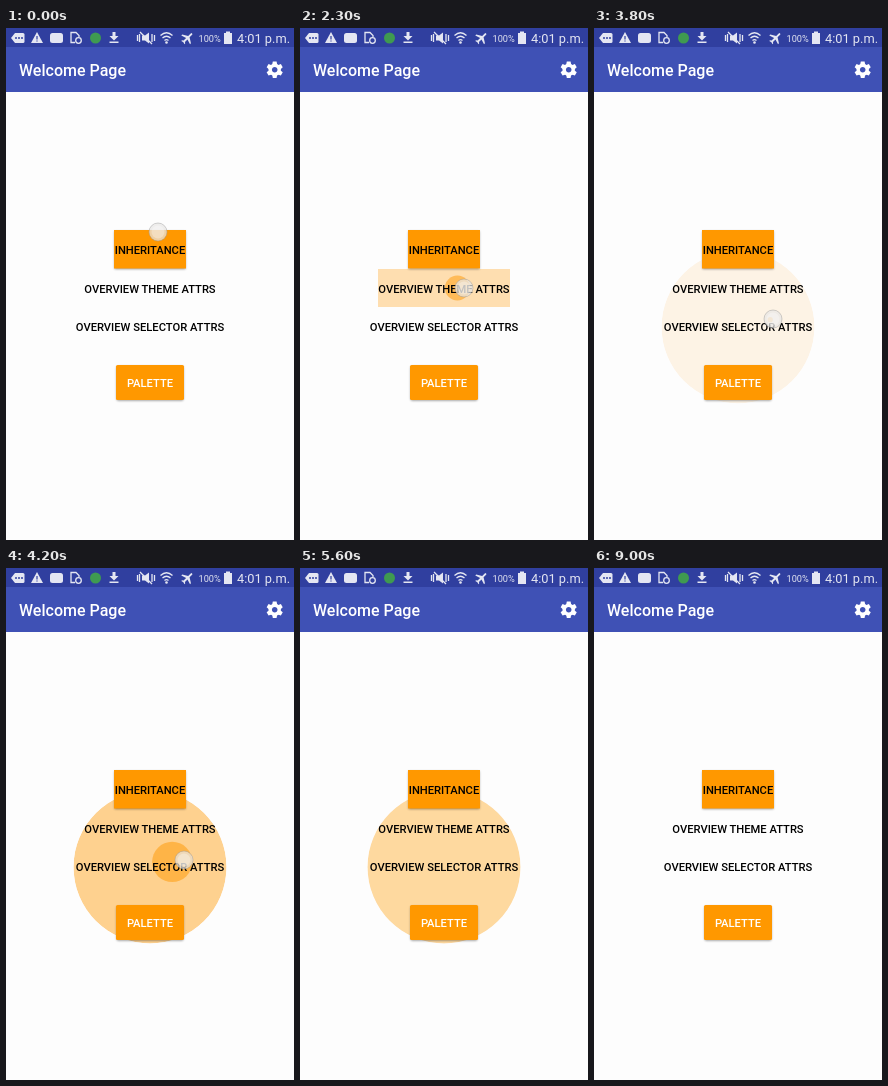
These frames come from a looping animation (288 by 512 pixels, 10 s). An HTML page:

```html
<!DOCTYPE html>
<html lang="en">
<head>
<meta charset="utf-8">
<title>Welcome Page</title>
<style>
html, body { margin: 0; width: 100%; height: 100%; overflow: hidden; background: #fdfdfd; }
svg { display: block; width: 100vw; height: 100vh; }
text { font-family: Roboto, "Noto Sans", sans-serif; }
.label { font-size: 11.2px; font-weight: 500; text-anchor: middle; }
.line { fill: none; stroke: #e4e6f2; stroke-width: 1.3; }
</style>
</head>
<body>
<svg viewBox="0 0 288 512">
  <defs>
    <filter id="blur" x="-20%" y="-30%" width="140%" height="170%">
      <feGaussianBlur id="soft" stdDeviation="1"/>
    </filter>
    <filter id="blur2" x="-20%" y="-30%" width="140%" height="170%">
      <feGaussianBlur id="soft2" stdDeviation="1"/>
    </filter>
    <clipPath id="rowClip"><rect x="78" y="241" width="132" height="38"/></clipPath>
    <clipPath id="roundClip"><circle cx="144" cy="299" r="76.5"/></clipPath>
  </defs>
  <rect width="288" height="512" fill="#fdfdfd"/>
  <rect width="288" height="64" fill="#3f51b5"/>
  <rect width="288" height="19" fill="#303f9f"/>

  <g fill="#e4e6f2">
    <path d="M5 10l4-5h8q1.500 0 1.500 1.500v7q0 1.500-1.500 1.500h-8z"/>
    <path d="M31 4l6 11h-12z"/>
    <rect x="44" y="5" width="13" height="10" rx="2.500"/>
    <path class="line" d="M69 14.500h-4v-10h5l3 3v1.500"/>
    <circle class="line" cx="72.500" cy="12.500" r="2.800"/>
    <circle cx="89.500" cy="10" r="5.500" fill="#3f9a50"/>
    <path d="M106.500 4h3v4h3l-4.500 4.500-4.500-4.500h3zM103.500 13.500h9v1.500h-9z"/>
    <path d="M136 7.500h3l4-3v11l-4-3h-3z"/>
    <path class="line" d="M131.500 7v6M133.500 6v8M146 6v8M148.500 7v6M134 4l12 12"/>
    <path class="line" d="M154.500 7.500q6-5.500 12 0M156.500 10q4-3.500 8 0M158.500 12.500q2-1.800 4 0"/>
    <circle cx="160.500" cy="14.500" r="1.300"/>
    <path transform="translate(181.500 10) rotate(45) scale(.65) translate(-11.5 -12)"
      d="M21 16v-2l-8-5V3.500a1.500 1.500 0 0 0-3 0V9l-8 5v2l8-2.500V19l-2 1.500V22l3.500-1 3.500 1v-1.500L13 19v-5.500z"/>
    <path d="M220 3.500h4v1.500h2v11h-8v-11h2z"/>
    <text x="192.500" y="13.500" font-size="9.200">100%</text>
    <text x="231" y="15" font-size="12.800">4:01 p.m.</text>
  </g>
  <g fill="#303f9f">
    <circle cx="10" cy="10" r="1"/><circle cx="13" cy="10" r="1"/><circle cx="16" cy="10" r="1"/>
    <path d="M30.400 8h1.200v3.500h-1.200zM30.400 12.400h1.200v1.200h-1.200z"/>
  </g>

  <text x="13" y="48" font-size="16" font-weight="500" fill="#fff">Welcome Page</text>
  <g id="gear" transform="translate(268.700 41.800)" fill="#fff">
    <circle r="4.500" fill="none" stroke="#fff" stroke-width="3.400"/>
  </g>

  <g clip-path="url(#rowClip)" fill="#ff9800">
    <rect id="rowBack" x="78" y="241" width="132" height="38"/>
    <circle id="rowWave"/>
  </g>
  <g clip-path="url(#roundClip)" fill="#ff9800">
    <circle id="roundBack" cx="144" cy="299" r="76.500"/>
    <circle id="roundWave"/>
  </g>

  <rect id="shadeA" x="108.500" width="71" height="38" filter="url(#blur)"/>
  <rect x="108" y="202" width="72" height="38.500" fill="#ff9800"/>
  <rect id="dimA" x="108" y="202" width="72" height="38.500"/>
  <rect id="shadeB" x="110.500" width="67" height="34.500" rx="1.600" filter="url(#blur2)"/>
  <rect x="110" y="337" width="68" height="35" rx="1.600" fill="#ff9800"/>
  <rect id="dimB" x="110" y="337" width="68" height="35" rx="1.600"/>

  <g class="label">
    <text x="144" y="226">INHERITANCE</text>
    <text x="144" y="264.500">OVERVIEW THEME ATTRS</text>
    <text x="144" y="303">OVERVIEW SELECTOR ATTRS</text>
    <text x="144" y="359" fill="#fff">PALETTE</text>
  </g>

  <g id="dot">
    <circle r="9" fill="#e8e6e4" fill-opacity=".72" stroke="#9a9a9a" stroke-opacity=".45"/>
    <circle r="6.500" fill="#fff" fill-opacity=".3"/>
  </g>
</svg>
<script>
const LOOP = 10000, STEP = 100;
const $ = id => document.getElementById(id);
const set = (id, attrs) => {
  for (const k in attrs) $(id).setAttribute(k, attrs[k]);
};
const clamp = v => Math.max(0, Math.min(1, v));
const ramp = (t, a, b) => clamp((t - a) / (b - a));
const mix = (a, b, p) => a + (b - a) * p;

// Each touch: start, end, then its path as [time, x, y]
const touches = [
  [0, 100, [0, 152, 204]],
  [800, 1400, [800, 150, 222]],
  [1800, 3000, [1800, 164, 260]],
  [3600, 5300, [3800, 179, 291], [4200, 178, 292], [5200, 185, 293]],
  [6200, 7300, [6200, 159, 356]]
];

for (let i = 0; i < 6; i++) {
  const tooth = document.createElementNS("http://www.w3.org/2000/svg", "path");
  tooth.setAttribute("d", "M-2.500-5l.6-3.200h3.800l.6 3.200z");
  tooth.setAttribute("transform", `rotate(${i * 60})`);
  $("gear").append(tooth);
}

function touchAt(t) {
  const hit = touches.find(([a, b]) => t >= a && t < b);
  if (!hit) return null;
  const path = hit.slice(2);
  let i = 0;
  while (i < path.length - 2 && t > path[i + 1][0]) i++;
  const a = path[i], b = path[i + 1] || a;
  const p = a === b ? 0 : ramp(t, a[0], b[0]);
  return [mix(a[1], b[1], p), mix(a[2], b[2], p)];
}

// The wave grows from the finger and drifts to the middle of its view
function ripple(name, t, start, release, fade, from, to, size) {
  const age = Math.max(0, t - start);
  const hurry = 2 * Math.max(0, t - release);
  const p = clamp(((age + hurry) / 1400) ** 1.33);
  const shift = p ** .75;
  const left = 1 - ramp(t, release, release + fade);
  set(name + "Back", { opacity: Math.min(.5, age * .00085) * left });
  set(name + "Wave", {
    cx: mix(from[0], to[0], shift),
    cy: mix(from[1], to[1], shift),
    r: size * p,
    opacity: age ? .5 * left : 0
  });
}

function raise(name, blur, y, t, down, up) {
  const lift = ramp(t, down, down + 150) * (1 - ramp(t, up, up + 200));
  set("shade" + name, { y: y + mix(1.2, 3, lift), opacity: mix(.38, .45, lift) });
  set(blur, { stdDeviation: mix(.8, 1.9, lift) });
  set("dim" + name, { opacity: .045 * lift });
}

function draw(t) {
  ripple("row", t, 1940, 2950, 550, [162, 260], [144, 260], 76);
  ripple("round", t, 3690, 5250, 600, [179, 291], [144, 299], 77);
  raise("A", "soft", 202, t, 850, 1350);
  raise("B", "soft2", 337, t, 6250, 7300);
  const at = touchAt(t);
  set("dot", { visibility: at ? "visible" : "hidden" });
  if (at) set("dot", { transform: `translate(${at})` });
}

const begin = performance.now();
function tick() {
  const t = (performance.now() - begin) % LOOP;
  draw(Math.floor(t / STEP) * STEP);
  requestAnimationFrame(tick);
}
tick();
</script>
</body>
</html>
```
